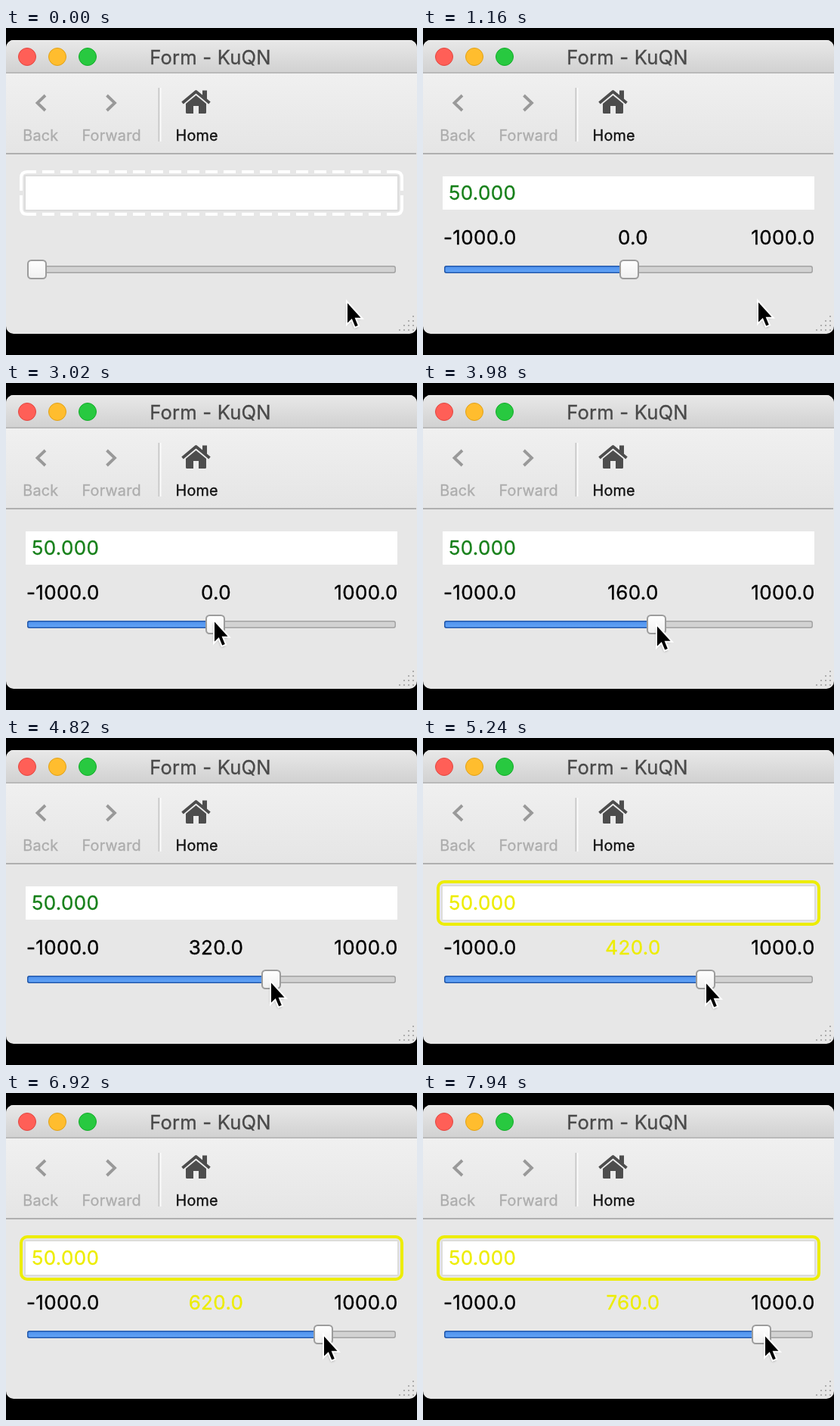
An HTML page for the animation above (8000 ms loop, 544x432 px).

```html
<!DOCTYPE html>
<html lang="en">
<head>
<meta charset="utf-8">
<title>Form</title>
<style>
html, body { margin: 0; width: 100%; height: 100%; overflow: hidden; background: #000; }
svg { display: block; width: 544px; height: 432px; }
text {
  font: 26px Inter, "Open Sans", sans-serif; letter-spacing: .35px; white-space: pre;
  fill: currentColor; stroke: currentColor; stroke-width: .35px;
}
.title { font-size: 25.6px; letter-spacing: .2px; color: #4a4a4a; }
.small { font-size: 19.8px; letter-spacing: .2px; color: #111; }
.off { color: #adadad; }
.mid { text-anchor: middle; }
.end { text-anchor: end; }
.line { fill: none; stroke-width: 4; }
</style>
</head>
<body>
<svg viewBox="0 0 544 432">
  <defs>
    <linearGradient id="bar" x2="0" y2="1"><stop stop-color="#e8e8e8"/><stop offset="1" stop-color="#d1d1d1"/></linearGradient>
    <linearGradient id="tools" x2="0" y2="1"><stop stop-color="#f0f0f0"/><stop offset="1" stop-color="#e5e5e5"/></linearGradient>
    <linearGradient id="knobFill" x2="0" y2="1"><stop stop-color="#fff"/><stop offset="1" stop-color="#f0f0f0"/></linearGradient>
    <linearGradient id="blue" x2="0" y2="1"><stop stop-color="#4f91ec"/><stop offset="1" stop-color="#63a5f8"/></linearGradient>
    <clipPath id="win"><rect y="16" width="544" height="388" rx="10"/></clipPath>
    <filter id="blur" x="-50%" y="-50%" width="200%" height="200%"><feGaussianBlur stdDeviation="1.5"/></filter>
  </defs>

  <g clip-path="url(#win)">
    <rect y="16" width="544" height="388" fill="#e7e7e7"/>
    <rect y="16" width="544" height="43" fill="url(#bar)"/>
    <rect y="16" width="544" height="1" fill="#f5f5f5"/>
    <rect y="58.5" width="544" height="1.5" fill="#b1b1b1"/>
    <rect y="60" width="544" height="105" fill="url(#tools)"/>
    <rect y="165" width="543" height="2" fill="#b0b0b0"/>
    <g id="grip" fill="#adadad"></g>
  </g>

  <circle cx="28" cy="38" r="11.5" fill="#ff5f57" stroke="#e2463f"/>
  <circle cx="68" cy="38" r="11.5" fill="#ffbd2e" stroke="#e1a116"/>
  <circle cx="108" cy="38" r="11.5" fill="#28c940" stroke="#12ac28"/>
  <text class="title mid" x="270.5" y="48">Form - KuQN</text>

  <path d="M52 89L41.500 99L52 109M133.500 89L144 99L133.500 109" fill="none" stroke="#999" stroke-width="3.8"/>
  <path d="M202.500 79V150" stroke="#c6c6c6" stroke-width="2"/>
  <path d="M204.500 79V150" stroke="#fafafa" stroke-width="2"/>
  <path d="M233.500 99L251.500 84L269.500 99" fill="none" stroke="#4d4d4d" stroke-width="3.8" stroke-linejoin="round"/>
  <path d="M260 82.500H266V96L260 91ZM251.500 89L265 100V111.500Q265 113 263.500 113H255V103H248V113H239.500Q238 113 238 111.500V100Z" fill="#4d4d4d"/>
  <text class="small off" x="22.3" y="149">Back</text>
  <text class="small off" x="100.5" y="149">Forward</text>
  <text class="small" x="224.5" y="149">Home</text>

  <rect x="26" y="196" width="492" height="44" fill="#fff"/>
  <rect id="edge" x="25" y="195" width="494" height="46" fill="none" stroke="#dcdcdc" stroke-width="2"/>
  <g id="dashed" class="line" stroke="#fff">
    <path d="M20 215V198Q20 190 28 190H40M504 190H516Q524 190 524 198V215M524 221V238Q524 246 516 246H504M40 246H28Q20 246 20 238V221"/>
    <path d="M48 190H496M48 246H496" stroke-dasharray="16 8"/>
  </g>
  <rect id="alarm" class="line" x="20" y="190" width="504" height="56" rx="8" stroke="#eded00"/>
  <text id="field" x="34" y="227">50.000</text>

  <g id="labels">
    <text x="27" y="286">-1000.0</text>
    <text id="value" class="mid" x="278" y="286"></text>
    <text class="end" x="518.8" y="286">1000.0</text>
  </g>

  <rect x="28.75" y="314.75" width="486.5" height="8.5" rx="2.5" fill="#d2d2d2" stroke="#a3a3a3" stroke-width="1.5"/>
  <rect id="fill" x="28.75" y="314.75" height="8.5" rx="2.5" fill="url(#blue)" stroke="#2359ad" stroke-width="1.5"/>
  <rect id="knob" y="307" width="24" height="24" rx="4.5" fill="url(#knobFill)" stroke="#9c9c9c" stroke-width="2"/>

  <g id="cursor">
    <path d="M0 3V30L6 24L10.500 35L15 33L10.500 22.500H18.500Z" opacity=".35" filter="url(#blur)"/>
    <path d="M1 1.500V27.500L6.800 22L11.200 32.500L14.800 31L10.600 20.800H18.500Z" stroke="#fff" stroke-width="4" paint-order="stroke"/>
  </g>
</svg>
<script>
const $ = id => document.getElementById(id);
const LOOP = 8000, STEP = 60, PHASE = 20;
const HIGH = 400;

// [time, slider value]
const values = [
  [2960, 0], [3020, 20], [3800, 140], [3920, 160], [4280, 160], [4340, 180],
  [4820, 340], [5120, 400], [5180, 420], [5480, 540], [6380, 540],
  [7220, 680], [7460, 740], [7820, 740], [7880, 760]
];
// [time, x, y] of the pointer tip after it reaches the knob
const drags = [
  [2960, 271, 313], [3020, 275, 314], [3800, 305, 322], [3980, 309, 320],
  [4280, 309, 320], [4820, 350, 322], [5120, 366, 324], [5540, 395, 322],
  [5660, 395, 322], [5720, 397, 319], [6380, 397, 319], [7220, 433, 321],
  [7520, 443, 321], [7880, 443, 321], [7940, 452, 320]
];

const mix = (a, b, u) => a + (b - a) * u;

function track(keys, t, col) {
  if (t <= keys[0][0]) return keys[0][col];
  const i = keys.findIndex(k => k[0] >= t);
  if (i < 0) return keys[keys.length - 1][col];
  const a = keys[i - 1], b = keys[i];
  return mix(a[col], b[col], (t - a[0]) / (b[0] - a[0]));
}

const valueAt = t => Math.round(track(values, t, 1) / 20) * 20;

function pointer(t) {
  const u = Math.min(1, Math.max(0, (t - 1100) / 780));
  const ease = u * u * (3 - 2 * u);
  if (u < 1) return [mix(451, 271, (u + ease) / 2), mix(362, 313, ease)];
  return [track(drags, t, 1), track(drags, t, 2)];
}

const show = (id, on) => $(id).style.display = on ? "" : "none";

function draw(time) {
  const t = Math.floor((time - PHASE) / STEP) * STEP + PHASE;
  const shown = valueAt(t - STEP);
  const high = shown >= HIGH;

  show("dashed", t < 500);
  show("alarm", high);
  show("edge", t < 500 || high);
  show("field", t >= 560);
  show("labels", t >= 560);
  $("field").style.color = high ? "#eded00" : "#17801a";
  $("value").style.color = high ? "#eded00" : "#000";
  $("value").textContent = shown.toFixed(1);

  const live = t >= 620;
  const x = live ? 272.5 + valueAt(t) * 0.231 : 41;
  show("fill", live);
  $("fill").setAttribute("width", x - 29);
  $("knob").setAttribute("x", Math.round(x) - 12);

  const [px, py] = pointer(t).map(Math.round);
  $("cursor").setAttribute("transform", `translate(${px} ${py})`);
}

for (let row = 0; row < 4; row++)
  for (let i = 0; i <= row; i++) {
    const dot = document.createElementNS("http://www.w3.org/2000/svg", "rect");
    const box = { x: 538 - 6 * i, y: 380 + 6 * row, width: 2, height: 2 };
    for (const key in box) dot.setAttribute(key, box[key]);
    $("grip").append(dot);
  }

const start = performance.now();
function tick() {
  draw((performance.now() - start) % LOOP);
  requestAnimationFrame(tick);
}
tick();
</script>
</body>
</html>
```
